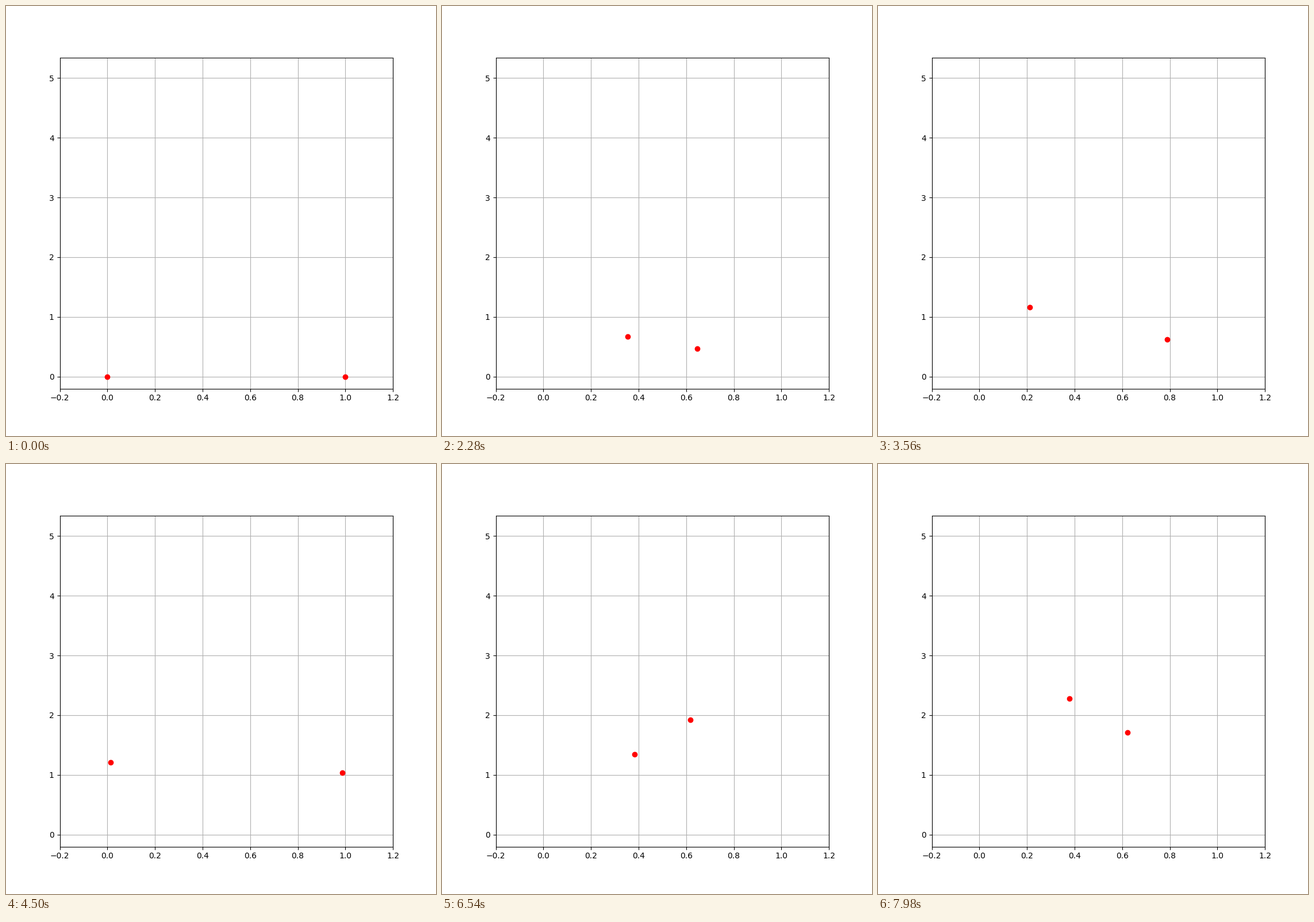
These frames come from a looping animation (748x748 px, 8000 ms). A matplotlib script:

```python
import math

import matplotlib.pyplot as plt
from matplotlib.animation import FuncAnimation

FRAMES = 400
DT = 0.01            # simulated time per frame
MU = 2.0             # G * (m1 + m2), both masses equal to 1
ECC = 0.5            # follows from start distance 1 and relative speed 1
AXIS = 2 / 3         # semi-major axis of the relative orbit
DRIFT = 0.5          # speed of the centre of mass


def eccentric_anomaly(mean):
    """Solve Kepler's equation by Newton's method."""
    e = mean
    for _ in range(12):
        e -= (e - ECC * math.sin(e) - mean) / (1 - ECC * math.cos(e))
    return e


def bodies(t):
    """Positions of both bodies; the orbit starts at its widest point."""
    mean = math.pi + math.sqrt(MU / AXIS ** 3) * t
    e = eccentric_anomaly(mean)
    rx = -AXIS * (math.cos(e) - ECC)
    ry = -AXIS * math.sqrt(1 - ECC ** 2) * math.sin(e)
    cx, cy = 0.5, DRIFT * t
    return [cx - rx / 2, cx + rx / 2], [cy - ry / 2, cy + ry / 2]


fig, ax = plt.subplots(figsize=(7.48, 7.48), dpi=100)
ax.set_xlim(-0.2, 1.2)
ax.set_ylim(-0.2, 5.34)
ax.grid(True)
dots, = ax.plot(*bodies(0), "ro")


def update(i):
    dots.set_data(*bodies(i * DT))
    return dots,


anim = FuncAnimation(fig, update, frames=FRAMES, interval=20,
                     repeat=True, repeat_delay=0, blit=True)
plt.show()
```
